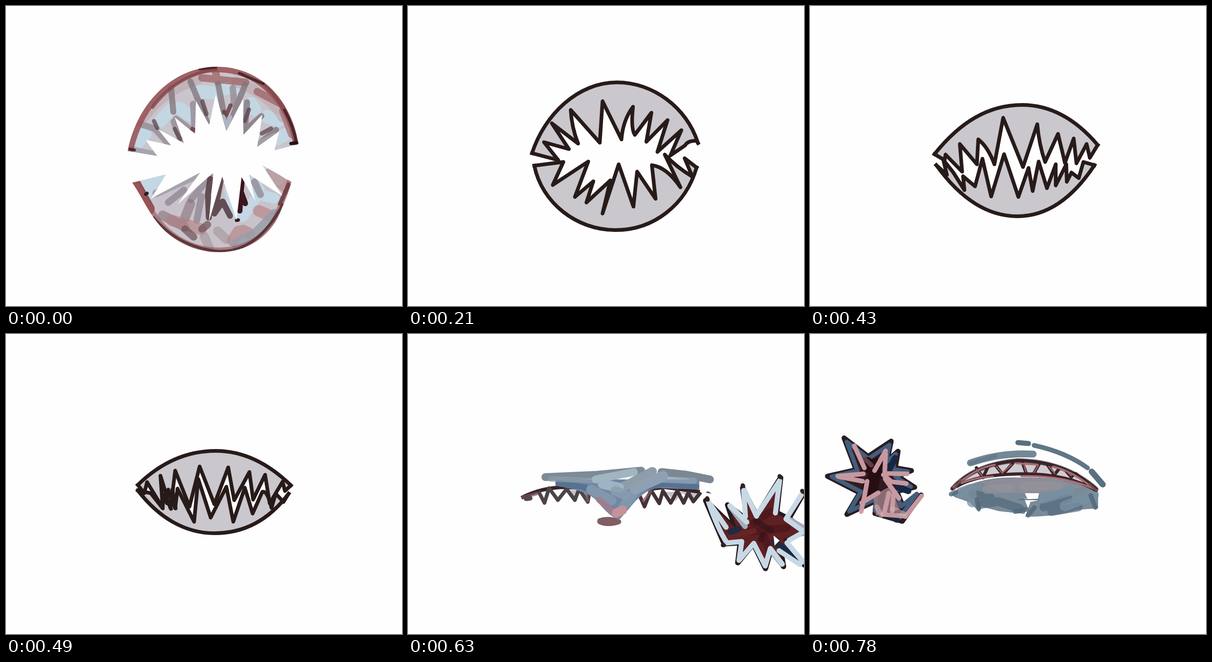
Recreate the animation shown at these times as an HTML page with a canvas. Size 859 px wide and 652 px high, loop 840 ms.

```html
<!DOCTYPE html>
<html lang="en">
<head>
<meta charset="utf-8">
<title>Biting jaws</title>
<style>
html, body { margin: 0; width: 100%; height: 100%; overflow: hidden; background: #fefefe; }
canvas { display: block; }
</style>
</head>
<body>
<canvas id="stage" width="859" height="652"></canvas>
<script>
const ctx = document.getElementById('stage').getContext('2d');
const INK = '#271b1a', GREY = '#cac7cd';

function fill(d, color, alpha = 1) {
  ctx.globalAlpha = alpha;
  ctx.fillStyle = color;
  ctx.fill(new Path2D(d));
}

function brush(d, color, width, alpha = 1, cap = 'round') {
  ctx.globalAlpha = alpha;
  ctx.strokeStyle = color;
  ctx.lineWidth = width;
  ctx.lineCap = cap;
  ctx.lineJoin = 'round';
  ctx.stroke(new Path2D(d));
}

function clipped(d, paint) {
  ctx.save();
  ctx.clip(new Path2D(d));
  paint();
  ctx.restore();
}

function scaled(x, y, k, paint) {
  ctx.save();
  ctx.translate(x, y);
  ctx.scale(k, k);
  ctx.translate(-x, -y);
  paint();
  ctx.restore();
}

// Each jaw is [outer curve, tooth points running back to its start].
function jaws(...list) {
  for (const [rim, teeth] of list) fill(rim + 'L' + teeth, GREY);
  for (const [rim, teeth] of list) {
    brush(rim, INK, 8, 1, 'square');
    brush('M' + teeth, INK, 8, 1, 'square');
  }
}

function openMouth() {
  const rim = 'M264 315C286 205 367 132 457 132C545 132 616 194 635 300';
  const top = rim + 'L582 314 593 272 545 306 556 236 515 280 514 202 478 272 455 192 441 259 412 206 410 278 366 242 386 298 330 268 358 303 303 291 328 326Z';
  clipped(top, () => {
    fill(top, '#c9c5cc');
    brush('M285 297L302 278M335 250L358 225M375 222L400 238M415 185L455 190M475 180L500 176M530 212L540 225M565 240L590 250M585 290L615 275', '#c3dae6', 28, .9);
    brush('M300 240Q345 180 415 160M500 165Q570 190 601 241', '#b99c9f', 24, .45);
    brush('M425 156L520 166M455 145L459 164M545 186L600 215', '#9d6265', 16, .75);
    brush('M565 170L598 207M603 228L622 278', '#a3686a', 21, .7);
    brush('M358 178L363 230M400 164L417 205 436 252M460 169L468 210 478 264M519 170L482 265M523 209L518 275M554 239L519 270M586 269L548 300', '#82757d', 13, .78);
    brush('M290 256L323 267 353 300M364 251L380 295M369 245L408 274M406 213L409 265M492 178L495 215', '#8f858e', 14, .72);
    brush('M270 311L328 323M548 299L583 282', '#a2a1aa', 13, .9);
    brush('M321 250L328 265M366 267L378 290M426 207L435 235M527 225L518 250M555 277L575 266', '#594149', 9, .72);
    brush('M404 267L409 270M473 230L478 237 487 216', '#633940', 9, .8);
    brush('M471 241L478 266 486 242', '#aeb5c0', 10);
    brush(rim, '#985256', 24, .85);
    brush('M318 220Q370 150 456 137M560 169Q620 230 629 301', '#82464a', 7, .8);
    brush('M420 137L455 133M506 146L558 169M604 226Q624 261 630 298M269 311L279 313', '#3e2024', 6, .85);
    brush('M618 299L630 297', '#261216', 7);
  });

  const base = 'M274 384C300 422 311 456 346 490C383 523 423 535 462 535C521 535 576 503 598 440Q612 410 619 382';
  const bottom = base + 'L556 346 600 413 527 366 541 424 511 372 500 465 469 371 440 469 450 362 373 430 421 362 315 418 347 366Z';
  clipped(bottom, () => {
    fill(bottom, '#c8c3ca');
    brush('M302 388L339 373M310 410L321 397M485 397L496 450M513 458L547 410M538 378L550 400M557 412L582 418M559 350L590 379', '#c3dae6', 23, .92);
    brush('M326 407L416 367', '#a3a0a8', 17, .9);
    brush('M352 427L386 400M401 421L443 371M424 414L414 465M539 382L552 410', '#918590', 15, .75);
    brush('M443 376L438 410 440 460M466 377L457 425 452 451 470 425 486 456', '#584149', 13, .9);
    brush('M512 378L508 421 507 445M511 407L519 429', '#3b1621', 12);
    brush('M340 455L387 480M400 430L388 461', '#88727a', 21, .6);
    brush('M360 466L423 485M492 510L504 490 515 488 527 494M572 365L610 396M548 445L578 458', '#b47e80', 25, .6);
    brush('M388 485L407 502M425 485L437 475', '#684a50', 16, .65);
    brush('M430 500L441 526M459 489L478 507', '#a38f96', 20, .55);
    brush('M500 517L541 497 584 453', '#989eaa', 24, .82);
    brush('M279 387L309 441', '#8e5054', 27);
    brush(base, '#9b585b', 20, .65);
    brush('M320 460Q377 526 462 533Q544 536 600 432', '#49282d', 6, .8);
    brush('M594 430L613 388', '#5f3438', 9, .75);
    brush('M303 409L306 407M500 466L504 465', '#311a20', 7);
  });
}

function inkWide() {
  jaws(
    ['M269 320C297 234 370 166 453 166C532 166 604 221 628 295',
     '629 298 626 293Q607 292 601 303L569 325 593 270 541 317 563 248 517 295 528 232 492 280Q483 267 488 219Q466 249 463 290L422 207 416 297 353 226Q355 264 369 299L312 255 349 311 295 296 326 335 269 320'],
    ['M274 347C290 427 365 487 450 487C534 487 603 431 626 351',
     '626 351 600 331 617 371Q582 350 557 323L591 394Q561 350 529 346L537 419 497 360 489 436 457 344 422 451 439 379 387 427 402 381 362 415 391 338 314 389 337 339Q304 343 274 347']
  );
}

function inkHalf() {
  jaws(
    ['M270 322C326 252 387 215 460 215C526 215 580 250 624 302',
     '624 302 607 330 600 300 578 342 572 288 553 341 538 278 510 339Q497 302 493 257L462 350 419 243 400 344Q386 306 365 290L362 344 325 300 330 360 294 323 292 335 270 322'],
    ['M274 346C323 414 380 457 450 457C515 457 570 417 617 346',
     '617 346 593 339 583 374 567 362 557 382 556 344 533 390 533 344 514 396 496 338 483 402 474 352 452 415 421 322 393 414 374 332 358 392 332 370 335 400 311 362 289 334 297 367 274 346']
  );
}

function inkNarrow() {
  jaws(
    ['M286 328C334 281 390 254 455 254C519 254 574 286 618 329',
     '618 329 605 341 600 321 572 368 562 306 536 360 528 300 495 361 482 290 452 370 420 288 398 375 367 297 357 379 335 308 340 378 306 322 300 346 286 328'],
    ['M286 340C333 401 390 433 452 433C515 433 570 405 613 347',
     '613 347 602 365 585 347 576 378Q567 340 556 343L535 390 518 334 493 408 478 332 444 399 417 315 408 408 372 336 367 379 352 338 349 368 341 349 340 379 314 346 286 340']
  );
  brush('M346 355L358 380M361 338L368 379', INK, 8);
}

function inkShut() {
  const shell = 'M292 331Q367 297 466 297Q588 297 611 337L608 346Q548 401 455 401Q350 401 292 331Z';
  fill(shell, GREY);
  fill('M404 339L412 348 404 366Z', '#fefefe');
  brush(shell, INK, 8);
  brush('M301 347L320 330 350 379M344 331L342 374M352 377L361 319 402 391 398 318 418 352M405 385Q405 346 424 321L450 397 455 338 455 398 477 312 503 391 528 320 556 379 548 322M556 379L567 324 586 358 601 326M588 326L585 361M592 350L606 353M594 330L605 345', INK, 8, 1, 'square');
}

function snout() {
  fill('M342 339L399 341 391 365 372 340 362 362ZM506 344L632 342 615 363 596 346 580 363 557 343Z', '#c6c0c9');
  brush('M246 356Q292 332 347 333L391 337M508 339L557 333 633 343', '#382326', 8, 1, 'butt');
  brush('M283 342L296 367 306 335 325 361 344 337 362 361 371 337 390 365 394 342', '#4b4448', 8, 1, 'butt');
  brush('M499 343L513 375 527 339 545 368 553 341 570 367 584 341 598 367 608 345 619 364 635 344', '#423336', 8, 1, 'butt');
  brush('M385 338L390 365M509 365L528 340', '#8c5d62', 6, .7, 'butt');
  brush('M246 356L281 346', '#725055', 8, .75, 'butt');
  brush('M256 358L265 357', '#59464b', 10);
  brush('M416 406Q435 399 457 408Q433 416 416 408', '#805e64', 11);
  fill('M320 316H632V338L543 335Q512 337 480 379L458 404Q437 397 411 364Q391 340 320 330Z', '#7187a2');
  brush('M326 324L383 333 421 350M511 333L557 326 625 332', '#506b8d', 13, .75);
  brush('M397 338L442 362M496 338L465 378', '#8097ad', 21);
  brush('M414 360L447 389', '#a57d8a', 13, .85);
  brush('M452 389L465 383', '#c69298', 20);
  brush('M298 311L410 306 506 297', '#7d8a97', 17);
  brush('M310 315L420 319', '#8c9daa', 12, .7);
  brush('M550 300L605 306 655 316', '#7c8793', 17);
  brush('M548 316L620 319', '#8ba0b3', 14, .8);
  brush('M530 299L462 335', '#8f9da9', 20);
  brush('M492 337L553 309', '#8da1b2', 23);
  brush('M407 316L490 300', '#a1b5c0', 17);
  brush('M422 326L458 334', '#9fb4c2', 21);
  brush('M450 341L471 350', '#879fb3', 22, .8);
  fill('M646 345Q650 338 658 347Z', '#4e5668');

  const burst = 'M652 365L714 425 697 374 737 405 728 339 757 397 806 318 798 390 820 401 853 350 823 402 859 429 813 446 859 500 806 466 812 501 788 459 775 505 750 454 718 493 723 452 690 454Z';
  scaled(765, 420, 1.055, () => brush(burst, '#281b20', 11));
  fill(burst, '#5e2022');
  brush('M750 411L786 386M739 430L822 421M771 435L783 467', '#4b171b', 17, .8);
  brush('M755 407L788 427M770 436L765 447', '#351419', 13, .65);
  brush('M700 440L750 428', '#682323', 13);
  brush('M700 430L716 424M795 451L855 496', '#202a42', 14);
  fill('M793 438L806 449 795 460Z', '#fefefe');
  brush('M700 376L731 418M786 470L811 500M823 401L859 422', '#a4acbc', 12);
  brush('M652 365Q672 424 692 454L724 451 718 492 750 455 775 504 786 466 812 500M654 368L690 420M698 373L735 409M728 340L732 397M730 340L756 396M756 395L806 319 797 389M820 402L853 350M820 402L859 430 827 448M805 471L850 501M822 454L857 495', '#c6d9e5', 11);
  brush('M649 357L650 360M683 459L685 459M726 329L727 330M806 309L808 311M855 341L857 343', '#302024', 9);
}

function closedMouth() {
  const burst = 'M74 226L126 266 176 233 167 276 191 255 185 291 220 297 190 309 227 333 188 342 204 380 241 350 200 407 141 390 144 362 80 392 108 345 38 309 100 295Z';
  fill(burst, '#301b21');
  brush(burst, '#291c20', 11, 1, 'butt');
  scaled(136, 319, .91, () => brush(burst, '#435d7d', 10));
  brush('M185 270L172 293M190 333L213 341M155 382L188 403', '#182544', 14);
  brush('M124 281L144 303 127 331M143 283L133 344', '#260e13', 27);
  brush('M112 265L133 285', '#6d4e59', 10, .75);
  fill('M137 351L174 331 195 381 143 395Z', '#9a7982', .85);
  brush('M96 243L118 291M164 254L140 297M164 260L162 303 211 304M60 309L116 304M62 310L114 320M124 320L119 348 111 386M112 367L148 345M159 306L177 321 209 325M163 315L193 357M171 346L161 389M181 350L178 390M157 392L205 396M207 397L242 352', '#cc9da4', 10, .96);
  brush('M145 376L154 394M179 380L205 392', '#d8b4ba', 11, .55);

  fill('M305 348Q367 308 451 312Q557 307 625 344L625 379 579 382Q529 398 467 397L478 365 501 360 465 358 472 376 465 391 410 385 372 375 367 387 347 366 315 355Z', '#798a99');
  fill('M369 321Q445 307 535 317L591 333 520 345 459 346 405 342Z', '#8e8c96');
  brush('M352 348L391 355M369 371L408 364 455 379M507 376L560 357M524 386L582 376', '#546b7c', 19, .72);
  brush('M327 345L348 337 352 365M505 357L565 340M553 374L615 350', '#7790a2', 23, .75);
  brush('M383 338L435 335M463 330L540 330', '#95929c', 19, .65);
  brush('M306 348L317 344M362 360L366 380M470 381L445 386M487 377L473 394M609 351L619 377', '#536878', 10, .8);
  fill('M466 346L497 346 494 358 472 359Z', '#fefefe');
  brush('M454 360L497 360', '#686671', 2);

  const top = 'M309 336Q356 283 450 275Q552 276 621 337';
  fill(top + 'Q550 298 459 304Q370 305 309 336Z', '#cfcbd1');
  brush('M348 280Q414 257 484 261', '#748896', 15);
  brush('M349 281L402 265', '#607482', 9, .6);
  brush('M451 236L474 238', '#596f7e', 11);
  brush('M486 242Q555 257 602 291', '#607686', 10);
  brush('M611 299L635 327', '#5a7080', 13);
  brush(top, '#5d5b65', 10, .75);
  brush(top, '#38242a', 7);
  brush('M319 331Q362 305 459 304Q556 303 621 340', '#3b2429', 7);
  brush('M361 291L375 312 386 289M402 285L418 305 440 281M461 280L469 303M498 281L485 304M515 284L530 306 542 291M552 294L567 311 573 303M577 304L598 322', '#38242a', 7);
  brush('M311 333Q359 291 401 284M447 281L494 284M527 288Q568 298 609 331M329 324Q361 311 397 310M458 309Q549 306 622 339', '#a96d72', 4);
  brush('M362 294L373 308M404 288L417 302 437 284M464 283L468 299M495 286L486 301M518 288L531 303M555 297L567 308', '#9a6267', 3);
  brush('M313 336L327 317M606 326L622 341', '#704a51', 5);
}

const scenes = [
  [210, openMouth], [140, inkWide], [140, inkHalf], [70, inkNarrow],
  [70, inkShut], [70, snout], [140, closedMouth]
];
const loop = scenes.reduce((sum, [ms]) => sum + ms, 0);
const start = performance.now();
let shown = null;

function tick(now) {
  let t = Math.max(0, now - start) % loop;
  const [, draw] = scenes.find(([ms]) => (t -= ms) < 0);
  if (draw !== shown) {
    shown = draw;
    ctx.globalAlpha = 1;
    ctx.fillStyle = '#fefefe';
    ctx.fillRect(0, 0, 859, 652);
    draw();
  }
  requestAnimationFrame(tick);
}
tick(start);
</script>
</body>
</html>
```
